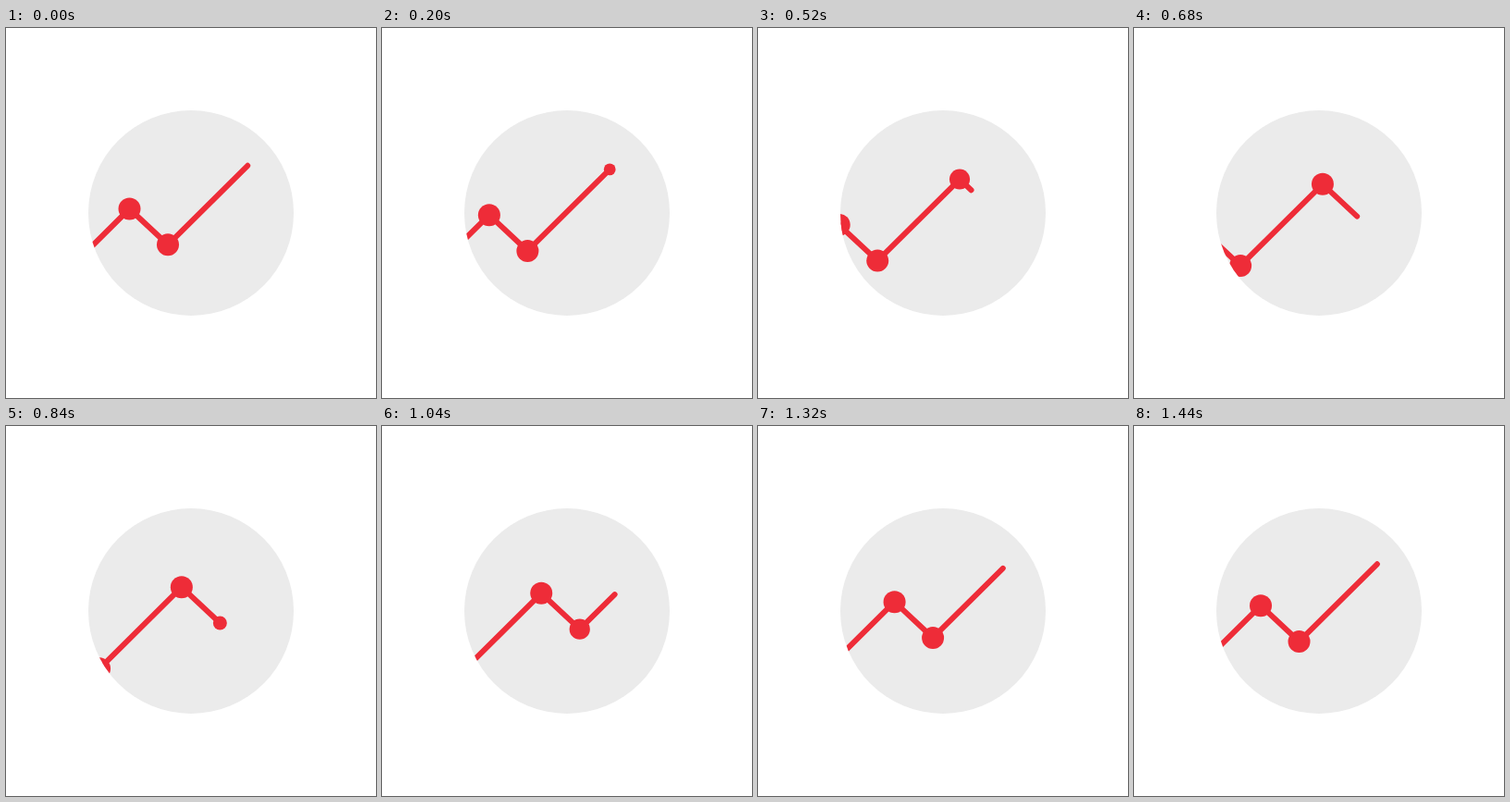
Write an HTML page with a canvas that moves like this. It is 400 px wide and 400 px high and loops after 1480 ms.

```html
<!DOCTYPE html>
<html lang="en">
<head>
<meta charset="utf-8">
<title>Rising line chart</title>
<style>
  html, body { margin: 0; width: 100%; height: 100%; overflow: hidden; background: #fff; }
  canvas { display: block; width: 400px; height: 400px; }
</style>
</head>
<body>
<canvas id="stage"></canvas>
<script>
const LOOP = 1480, STEP = 40, SIZE = 400;
const RED = '#ee2c38', GREY = '#ebebeb';
const DOT = 12, STROKE = 6;

// One period of the zigzag: a peak, then a valley; it repeats at PERIOD.
const PERIOD = { x: 130.3, y: -49.3 };
const PEAK = { x: 133.5, y: 195.5 };
const VALLEY = { x: 175, y: 234.3 };

const canvas = document.getElementById('stage');
const ctx = canvas.getContext('2d');
const ratio = window.devicePixelRatio || 1;
canvas.width = canvas.height = SIZE * ratio;

const clamp = v => Math.min(1, Math.max(0, v));
const easeOut = u => 1 - (1 - u) ** 2;
const progress = (t, start, duration) => easeOut(clamp((t - start) / duration));
const repeat = (p, n) => ({ x: p.x + n * PERIOD.x, y: p.y + n * PERIOD.y });
const mix = (a, b, k) => ({ x: a.x + (b.x - a.x) * k, y: a.y + (b.y - a.y) * k });

const upward = t => progress(t, 858, 750);
const downward = t => progress(t, 469, 311);
const peakRadius = t => t < 20 ? 0 : Math.min(DOT, 3.5 + 0.0145 * t);
const valleyRadius = t => t < 725 ? 0 : 3 + (DOT - 3) * progress(t, 690, 512);

function disc(p, r, color) {
  ctx.fillStyle = color;
  ctx.beginPath();
  ctx.arc(p.x, p.y, r, 0, Math.PI * 2);
  ctx.fill();
}

function drawChart(t) {
  const nextPeak = repeat(PEAK, 1), nextValley = repeat(VALLEY, 1);
  const points = [repeat(VALLEY, -1), PEAK, VALLEY, mix(VALLEY, nextPeak, upward(t + LOOP))];
  if (downward(t) > 0) points.push(mix(nextPeak, nextValley, downward(t)));
  if (upward(t) > 0) points.push(mix(nextValley, repeat(PEAK, 2), upward(t)));

  ctx.strokeStyle = RED;
  ctx.lineWidth = STROKE;
  ctx.lineCap = ctx.lineJoin = 'round';
  ctx.beginPath();
  points.forEach(p => ctx.lineTo(p.x, p.y));
  ctx.stroke();

  disc(PEAK, DOT, RED);
  disc(VALLEY, DOT, RED);
  disc(nextPeak, peakRadius(t), RED);
  disc(nextValley, valleyRadius(t), RED);
}

function render(t) {
  ctx.setTransform(ratio, 0, 0, ratio, 0, 0);
  ctx.fillStyle = '#fff';
  ctx.fillRect(0, 0, SIZE, SIZE);
  disc({ x: 200, y: 200 }, 111, GREY);

  ctx.save();
  ctx.beginPath();
  ctx.arc(200, 200, 111, 0, Math.PI * 2);
  ctx.clip();
  ctx.translate(-PERIOD.x * t / LOOP, -PERIOD.y * t / LOOP);
  drawChart(t);
  ctx.restore();
}

function tick() {
  const t = performance.now() % LOOP;
  render(Math.floor(t / STEP) * STEP);
  requestAnimationFrame(tick);
}
tick();
</script>
</body>
</html>
```
